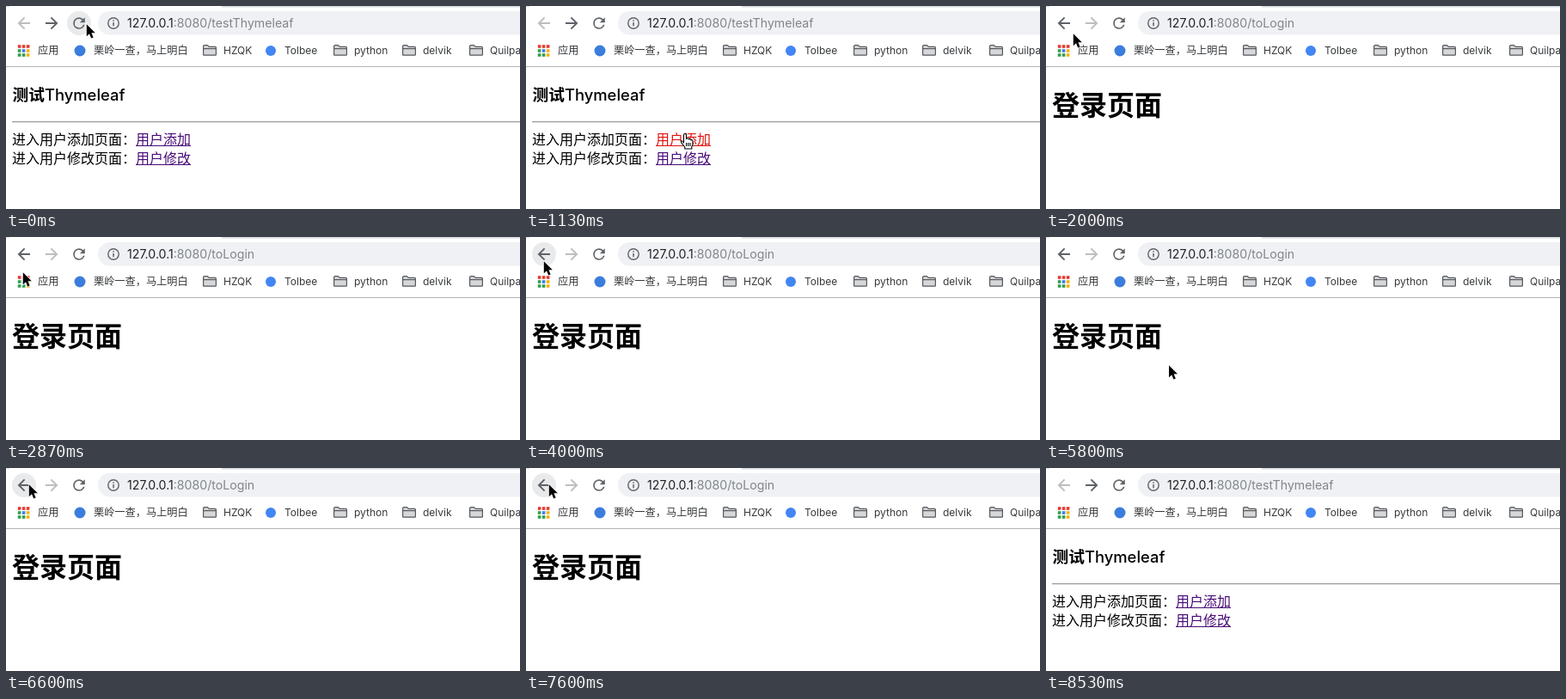
An HTML page for the animation above (8.59 s loop, 598x236 px).

```html
<!DOCTYPE html>
<html lang="zh-CN">
<head>
<meta charset="utf-8">
<title>测试Thymeleaf</title>
<style>
  html, body { margin: 0; width: 100%; height: 100%; overflow: hidden; background: #fff; }
  svg { display: block; }
  text { font-family: "Noto Sans CJK SC", "Noto Sans CJK", sans-serif; font-size: 16px; }
  .url { font: 14.15px Inter, sans-serif; }
  .bookmark { font: 12px Inter, "Noto Sans CJK SC", sans-serif; fill: #36393c; }
  .cjk { font-size: 12.2px; }
  .title { font-size: 18.72px; font-weight: 700; }
  .title tspan { font: 500 18.4px Inter, sans-serif; }
  .heading { font-size: 32px; font-weight: 700; }
  .arrow { fill: none; stroke: #5f6368; stroke-width: 1.9; }
  .disabled { stroke: #bbbdc0; }
  .hover { fill: #e9eaeb; }
  .link { fill: #480c78; }
  .link.active { fill: #e0140f; }
</style>
</head>
<body>
<svg width="598" height="236" viewBox="0 0 598 236">
  <defs>
    <path id="back" d="M28 20H15.5M21.6 13.3L14.9 20l6.7 6.7"/>
    <g id="folder" stroke="#55585c" stroke-width="1.2" stroke-linejoin="round">
      <path d="M.6 11.4V1.8q0-1.2 1.2-1.2h3.7l1.7 1.8h7q1.2 0 1.2 1.2v7.8q0 .8-.8.8H1.4q-.8 0-.8-.8z" fill="#d5d7d9"/>
      <path d="M.8 4.6h14.4"/>
    </g>
  </defs>

  <!-- toolbar -->
  <path d="M0 0h4v1H0zM251 0h347v1.5H251z" fill="#d5d8dd"/>
  <circle id="backHover" class="hover" cx="21" cy="20" r="14"/>
  <circle id="reloadHover" class="hover" cx="85" cy="20" r="14"/>
  <use id="backArrow" href="#back" class="arrow"/>
  <use id="forwardArrow" href="#back" class="arrow" transform="translate(74 0) scale(-1 1)"/>
  <path fill="#5f6368" transform="translate(85 20) scale(.85) translate(-12 -12)"
    d="M17.65 6.35A7.96 7.96 0 0 0 12 4a8 8 0 1 0 7.73 10h-2.08A6 6 0 1 1 12 6c1.66 0 3.14.69 4.22 1.78L13 11h7V4z"/>
  <rect x="107" y="6" width="520" height="27.5" rx="13.75" fill="#eff1f4"/>
  <circle cx="125" cy="20" r="6.2" fill="none" stroke="#5f6368" stroke-width="1.4"/>
  <path d="M124.3 19h1.5v4.2h-1.5zM124.3 16.3h1.5v1.5h-1.5z" fill="#5f6368"/>
  <text class="url" x="141" y="25" fill="#202124">127.0.0.1<tspan id="path" fill="#80868b"></tspan></text>

  <!-- bookmarks -->
  <g id="apps"></g>
  <circle cx="86" cy="52" r="6.5" fill="#3b7ddd"/>
  <circle cx="308" cy="52" r="6" fill="#4285f4"/>
  <use href="#folder" x="229" y="45"/>
  <use href="#folder" x="381" y="45"/>
  <use href="#folder" x="461" y="45"/>
  <use href="#folder" x="539" y="45"/>
  <text class="bookmark cjk" x="37" y="56">应用</text>
  <text class="bookmark cjk" x="102" y="56">栗岭一查，马上明白</text>
  <text class="bookmark" x="253" y="56">HZQK</text>
  <text class="bookmark" x="324" y="56">Tolbee</text>
  <text class="bookmark" x="405" y="56">python</text>
  <text class="bookmark" x="485" y="56">delvik</text>
  <text class="bookmark" x="563" y="56">Quilpa</text>
  <rect y="70" width="598" height="1" fill="#b4b4b4"/>

  <g id="testPage">
    <text class="title" x="7.5" y="110">测试<tspan>Thymeleaf</tspan></text>
    <rect x="7" y="134" width="591" height="1" fill="#999"/>
    <rect x="7" y="135" width="591" height="1" fill="#e6e6e6"/>
    <text x="7" y="161">进入用户添加页面：</text>
    <text x="7" y="183">进入用户修改页面：</text>
    <g id="addLink" class="link"><text x="151" y="161">用户添加</text><rect x="151" y="162" width="64" height="1"/></g>
    <g id="editLink" class="link"><text x="151" y="183">用户修改</text><rect x="151" y="184" width="64" height="1"/></g>
  </g>
  <text id="loginPage" class="heading" x="7" y="127">登录页面</text>

  <g id="cursor">
    <path id="pointer" d="M.8 1.2V15.2L4 12.2L6.2 17.4L8.6 16.4L6.4 11.3H10.8Z" stroke="#fff" stroke-width="1.4" paint-order="stroke"/>
    <path id="hand" fill="#fff" stroke="#000" stroke-width="1.1" stroke-linejoin="round" transform="translate(-1 -1)"
      d="M-1.5 10V1Q-1.4-.5 0-.5T1.5 1V5.5Q1.8 4.6 3 4.8T4.3 6Q4.8 5.3 5.8 5.6T6.9 7Q7.6 6.4 8.4 6.9T9 8.3V11.5Q9 13 7.8 14.5V17H-.2V15L-4.4 9.6Q-5 8.4-4.2 7.8Q-3 7.2-1.5 10ZM1.6 10v4M3.8 10v4M6 10v4"/>
  </g>
</svg>
<script>
const LOOP = 8590, STEP = 1000 / 15;
const $ = id => document.getElementById(id);

// cursor waypoints: time, x, y
const route = [
  [0, 93, 20], [133, 138, 89], [333, 138, 89], [870, 186, 150], [1400, 186, 150],
  [2000, 31, 31], [2333, 19, 40], [3460, 19, 40], [3530, 18, 48], [3660, 18, 48],
  [3930, 20, 27], [4200, 20, 27], [4866, 195, 183], [5530, 195, 183],
  [6133, 70, 100], [6600, 26, 18], [7600, 26, 18], [8266, 90, 196], [8530, 100, 240]
];

const red = "#e33b2e", green = "#2f9e4b", blue = "#3a7df0", amber = "#f7b106";
const dots = [red, red, red, green, blue, amber, green, green, amber];
$("apps").innerHTML = dots.map((color, i) =>
  `<rect x="${13.8 + i % 3 * 5}" y="${45.2 + Math.floor(i / 3) * 5}" width="3.6" height="3.6" fill="${color}"/>`).join("");

const between = (t, from, to) => t >= from && t < to;
const show = (id, visible) => $(id).setAttribute("visibility", visible ? "visible" : "hidden");

function cursorAt(t) {
  const next = route.findIndex(point => point[0] > t);
  if (next < 0) return route.at(-1).slice(1);
  const [t0, x0, y0] = route[next - 1], [t1, x1, y1] = route[next];
  const p = (t - t0) / (t1 - t0), ease = p * p * (3 - 2 * p);
  return [x0 + (x1 - x0) * ease, y0 + (y1 - y0) * ease];
}

function draw(now) {
  const t = Math.floor((now % LOOP + 4) / STEP) * STEP;
  const login = between(t, 1260, 4130) || between(t, 5460, 7660);
  const [x, y] = cursorAt(t);
  const overLink = !login && between(x, 151, 215) && (between(y, 145, 165) || between(y, 167, 188));

  show("testPage", !login);
  show("loginPage", login);
  $("path").textContent = login ? ":8080/toLogin" : ":8080/testThymeleaf";
  $("backArrow").classList.toggle("disabled", !login);
  $("forwardArrow").classList.toggle("disabled", login);
  show("backHover", login && Math.hypot(x - 21, y - 20) < 14);
  show("reloadHover", Math.hypot(x - 85, y - 20) < 14);
  $("addLink").classList.toggle("active", between(t, 1130, 1260));
  $("editLink").classList.toggle("active", between(t, 5330, 5460));
  show("hand", overLink);
  show("pointer", !overLink);
  $("cursor").setAttribute("transform", `translate(${x} ${y})`);
}

const start = performance.now();
function tick() {
  draw(performance.now() - start);
  requestAnimationFrame(tick);
}
tick();
</script>
</body>
</html>
```
